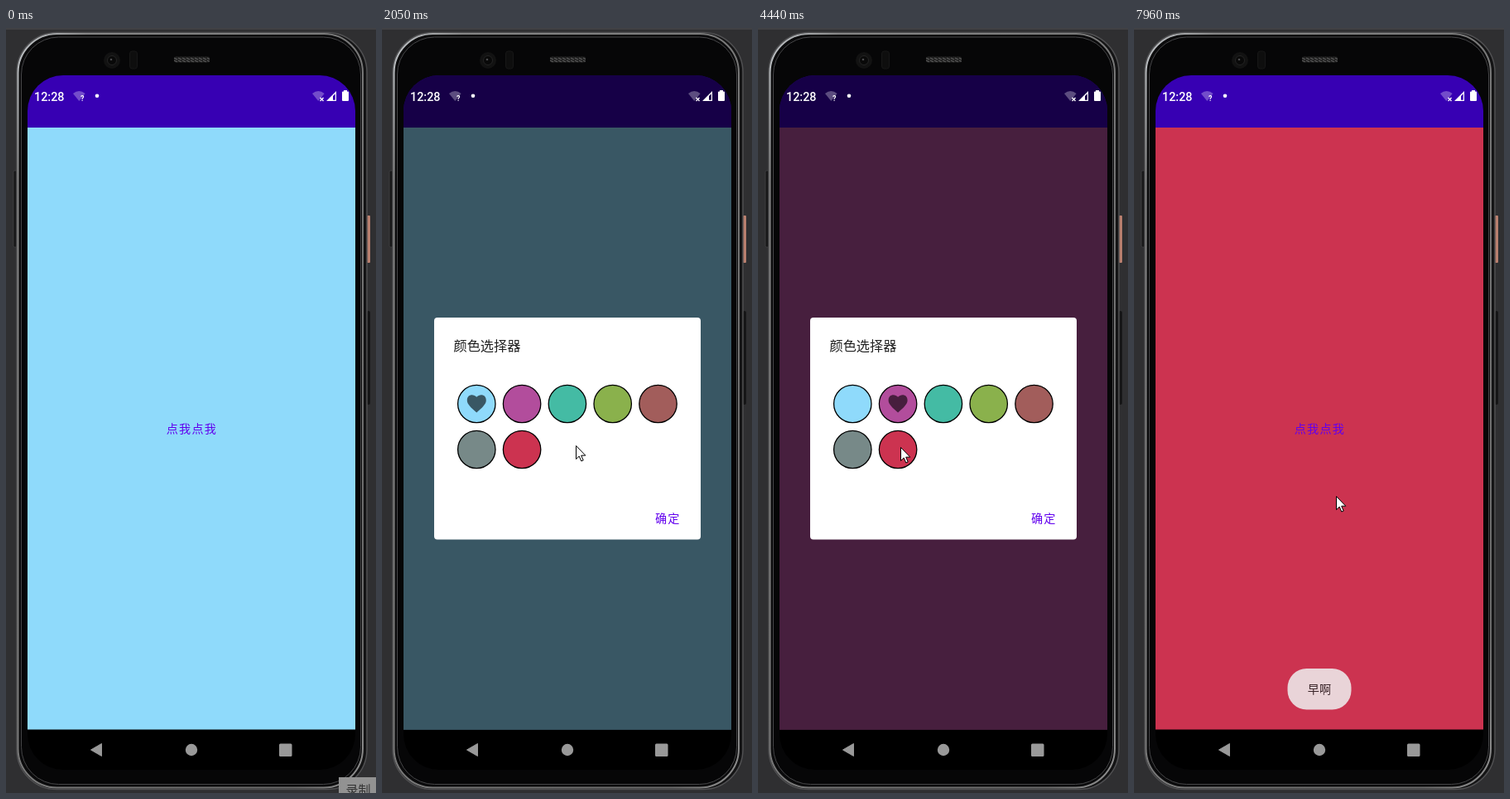
Recreate the animation shown at these times as an HTML page. Size 447 by 922 pixels, loop 8 s.

```html
<!DOCTYPE html>
<html lang="zh-CN">
<head>
<meta charset="utf-8">
<title>颜色选择器</title>
<style>
  html, body { margin: 0; width: 100%; height: 100%; overflow: hidden; background: #2f2f31; }
  svg { display: block; width: 447px; height: 922px; }
  text { font: 350 14.1px "Noto Sans CJK SC", "Noto Sans CJK", sans-serif; }
  .button { letter-spacing: 1.26px; fill: #6200ee; }
  .title { font-size: 16.2px; fill: #212121; }
  .clock { font: 500 14.4px Roboto, sans-serif; }
  .mark { font: 700 9px Roboto, sans-serif; }
</style>
</head>
<body>
<svg viewBox="0 0 447 922">
  <defs>
    <linearGradient id="rim" x1="0" y1="0" x2="1" y2="1">
      <stop offset="0" stop-color="#c4c8cc"/>
      <stop offset=".1" stop-color="#858585"/>
      <stop offset=".9" stop-color="#6c6c6c"/>
      <stop offset="1" stop-color="#929292"/>
    </linearGradient>
    <pattern id="mesh" width="5" height="7" patternUnits="userSpaceOnUse" x="203" y="35">
      <path d="M0 1L4 3M0 4L4 6" stroke="#555" stroke-width="1.2"/>
    </pattern>
    <clipPath id="screen"><rect x="26" y="57" width="396" height="837" rx="43"/></clipPath>
    <clipPath id="page"><rect x="26" y="120" width="396" height="725.5"/></clipPath>
    <path id="wifi" d="M0 3Q7.3 -3 14.6 3L7.3 12Z"/>
  </defs>

  <!-- phone body -->
  <rect width="447" height="922" fill="#2f2f31"/>
  <rect width="447" height="2" fill="#414144"/>
  <rect x="9" y="172" width="4" height="92" rx="1.5" fill="#171718" stroke="#47474a" stroke-width=".7"/>
  <rect x="436" y="341" width="4" height="113" rx="2" fill="#161617"/>
  <rect x="436" y="226" width="4" height="57" rx="1" fill="#b97f6e"/>
  <rect x="13" y="5.5" width="423" height="912" rx="48" fill="#141415" stroke="#505052" stroke-width="1.5"/>
  <rect x="14.5" y="7" width="416.5" height="908.5" rx="47" fill="#0b0b0c" stroke="url(#rim)" stroke-width="2"/>
  <rect x="18.5" y="11" width="410" height="900.5" rx="45" fill="#060607" stroke="#454547"/>
  <circle cx="128" cy="39" r="10" fill="#121212"/>
  <circle cx="128" cy="39" r="5.5" fill="#090909" stroke="#242424"/>
  <circle cx="127" cy="38" r="1.3" fill="#4a4a4c"/>
  <rect x="149.5" y="28" width="9" height="21" rx="3" fill="#0e0e0e" stroke="#171717"/>
  <rect x="203" y="34.5" width="43" height="7" rx="2" fill="#202020"/>
  <rect x="203" y="34.5" width="43" height="7" rx="2" fill="url(#mesh)"/>

  <g clip-path="url(#screen)">
    <rect x="26" y="57" width="396" height="837"/>
    <rect x="26" y="57" width="396" height="63" fill="#3700b3"/>
    <rect id="back" x="26" y="120" width="396" height="725.5"/>
    <g clip-path="url(#page)"><circle id="ripple" cx="234" cy="493" fill="#6200ee" opacity=".12"/></g>
    <text class="button" x="193.7" y="488.3">点我点我</text>
    <rect id="dim" x="26" y="57" width="396" height="788.5"/>

    <!-- status icons -->
    <g fill="#fff">
      <text class="clock" x="34" y="87.8">12:28</text>
      <use href="#wifi" x="81" y="76" opacity=".3"/>
      <text class="mark" x="90" y="87.5">?</text>
      <circle cx="110" cy="81.8" r="2.3"/>
      <use href="#wifi" x="370" y="76" opacity=".3"/>
      <path d="M379.5 84l4 4m0-4l-4 4" stroke="#fff" stroke-width="1.4"/>
      <path d="M387 88L399 76V88ZM395 82V86.8H397.8V79.2Z" fill-rule="evenodd"/>
      <rect x="408" y="75" width="4" height="3"/>
      <rect x="406" y="76.5" width="8" height="11.5" rx="1"/>
    </g>
    <g fill="#999">
      <path d="M102.5 870L115.5 862.5V877.5Z" stroke="#999" stroke-linejoin="round"/>
      <circle cx="224" cy="870" r="7.2"/>
      <rect x="330" y="862.5" width="15.5" height="15.5" rx="1.5"/>
    </g>

    <g id="dialog">
      <rect x="63" y="349" width="322" height="267.5" rx="4" fill="#fff"/>
      <text class="title" x="86.5" y="388.7">颜色选择器</text>
      <g id="swatches" stroke="#000" stroke-width="1.3"></g>
      <path id="heart" fill-opacity=".6" d="M0 9.2C-6 3.8-10 .3-10-3.7C-10-10.3-3-10.6 0-7.1C3-10.6 10-10.3 10-3.7C10 .3 6 3.8 0 9.2Z"/>
      <rect id="press" x="-23.2" y="-23.2" width="46.5" height="46.5"/>
      <text class="button" x="330" y="596">确定</text>
    </g>

    <g id="toast">
      <rect x="185.5" y="772" width="77" height="49.5" rx="23" fill="#eee"/>
      <text x="209.8" y="802.3" fill="#222">早啊</text>
    </g>
  </g>

  <g id="badge">
    <rect x="402" y="903" width="45" height="19" fill="#929292"/>
    <text x="410.5" y="924" style="font-size:15px" fill="#333">录制</text>
  </g>
  <path id="cursor" d="M.5 .5V16.6L4.2 13.1L6.8 19L9.2 18L6.7 12.2H11.8Z" fill="#fff" stroke="#000"/>
</svg>

<script>
const LOOP = 8000;
const COLORS = ['#8fdafb', '#b24d9c', '#44bba4', '#8ab14c', '#a25d5b', '#778988', '#cc3350'];
const PURPLE = 1, RED = 6;
const OPEN = 1900, PICK_PURPLE = 3420, PICK_RED = 4830, CLOSE = 5920, TOAST = 6030;

// Pointer moves: start, end, x, y
const ENTRY = [377, 903];
const MOVES = [
  [270, 930, 234, 493],
  [1980, 2050, 234, 503],
  [2400, 2710, 235, 481],
  [2850, 3110, 170, 434],
  [3440, 3580, 177, 485],
  [4000, 4300, 172, 505],
  [5040, 5370, 333, 600],
  [5400, 5840, 343, 604],
  [6250, 6800, 238, 493],
  [7300, 7570, 234, 486],
  [7860, 7960, 244, 564]
];

const el = id => document.getElementById(id);
const set = (id, name, value) => el(id).setAttribute(name, value);
const show = (id, on) => set(id, 'visibility', on ? 'visible' : 'hidden');
const ramp = (t, from, to) => Math.min(1, Math.max(0, (t - from) / (to - from)));
const ease = p => p * p * (3 - 2 * p);
const fade = (t, start, end, length) => ramp(t, start, start + length) - ramp(t, end, end + length);
const cell = i => [114.3 + (i % 5) * 54.8, 453 + Math.floor(i / 5) * 55];

// Touch feedback: quick in, slow out
const press = (t, pick) => .12 * (ramp(t, pick - 80, pick - 20) - ramp(t, pick + 40, pick + 280));

function pointer(t) {
  let [x, y] = ENTRY;
  for (const [start, end, toX, toY] of MOVES) {
    const p = ease(ramp(t, start, end));
    x += (toX - x) * p;
    y += (toY - y) * p;
  }
  return [Math.round(x), Math.round(y)];
}

el('swatches').innerHTML = COLORS.map((color, i) => {
  const [x, y] = cell(i);
  return `<circle cx="${x}" cy="${y}" r="22.7" fill="${color}"/>`;
}).join('');

function draw(t) {
  const picked = t < PICK_PURPLE ? 0 : t < PICK_RED ? PURPLE : RED;
  set('back', 'fill', COLORS[picked]);
  set('heart', 'transform', `translate(${cell(picked)}) scale(1.15)`);
  set('press', 'transform', `translate(${cell(t < 4200 ? PURPLE : RED)})`);
  set('press', 'opacity', press(t, PICK_PURPLE) + press(t, PICK_RED));

  set('ripple', 'r', t < OPEN + 90 ? 460 * ramp(t, 1630, 1840) : 0);
  const opened = fade(t, OPEN, CLOSE, 130);
  set('dim', 'opacity', .6 * opened);
  set('dialog', 'opacity', opened);
  const zoom = .9 + .1 * ramp(t, OPEN, OPEN + 130);
  set('dialog', 'transform', `translate(224 482.5) scale(${zoom}) translate(-224 -482.5)`);
  set('toast', 'opacity', fade(t, TOAST, TOAST + 1890, 150 + 150 * ramp(t, 7000, 7001)));

  set('cursor', 'transform', `translate(${pointer(t)})`);
  show('cursor', t >= MOVES[0][0]);
  show('badge', t < 70);
}

function tick() {
  draw(performance.now() % LOOP);
  requestAnimationFrame(tick);
}
tick();
</script>
</body>
</html>
```
